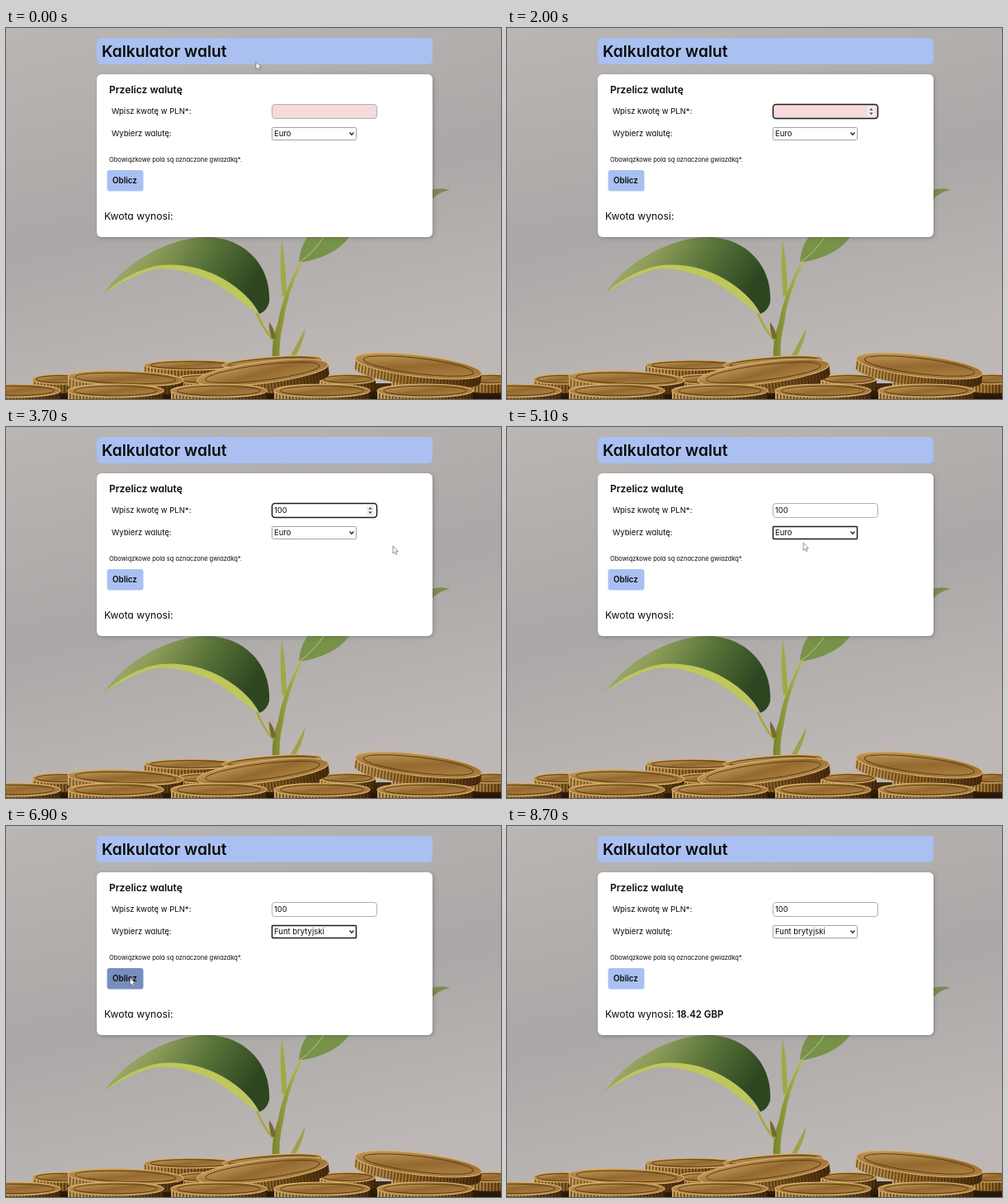
An HTML page that plays this animation: 600 px wide and 449 px high, repeating every 8.8 s.

```html
<!DOCTYPE html>
<html lang="pl">
<head>
<meta charset="utf-8">
<title>Kalkulator walut</title>
<style>
  html, body { margin: 0; width: 100%; height: 100%; overflow: hidden; background: #b3b0af; }
  svg { display: block; width: 100vw; height: 100vh; }
  text { font-family: Inter, "Open Sans", sans-serif; font-feature-settings: "cv11", "calt" 0; fill: #0c0c0c; }
  .bold { font-weight: 600; }
  .label { font-size: 9.5px; }
</style>
</head>
<body>
<svg viewBox="0 0 600 449" preserveAspectRatio="none">
  <defs>
    <linearGradient id="wall" x1="0" y1="0" x2=".3" y2="1">
      <stop offset="0" stop-color="#b9b6b4"/>
      <stop offset=".55" stop-color="#aaa7a6"/>
      <stop offset="1" stop-color="#bdb8b6"/>
    </linearGradient>
    <linearGradient id="leaf" x1="0" x2="1" y2=".3">
      <stop offset="0" stop-color="#b1b986"/>
      <stop offset=".35" stop-color="#8b9b57"/>
      <stop offset=".65" stop-color="#587239"/>
      <stop offset="1" stop-color="#2d4620"/>
    </linearGradient>
    <linearGradient id="stem" x1="0" x2="1">
      <stop offset="0" stop-color="#78832a"/>
      <stop offset="1" stop-color="#b7bb52"/>
    </linearGradient>
    <linearGradient id="face" x1="0" y1="0" x2="1" y2="1">
      <stop offset="0" stop-color="#d3ab69"/>
      <stop offset=".5" stop-color="#94692f"/>
      <stop offset="1" stop-color="#b98e4c"/>
    </linearGradient>
    <linearGradient id="rim" x1="0" x2="1">
      <stop offset="0" stop-color="#cda25c"/>
      <stop offset=".4" stop-color="#a2742f"/>
      <stop offset="1" stop-color="#4a2c0c"/>
    </linearGradient>
    <linearGradient id="floor" x1="0" y1="0" x2="0" y2="1">
      <stop offset="0" stop-color="#5c3c17"/>
      <stop offset="1" stop-color="#241305"/>
    </linearGradient>
    <pattern id="ridges" width="4" height="30" patternUnits="userSpaceOnUse">
      <rect width="1.6" height="30" fill="#2c1804" opacity=".6"/>
    </pattern>
    <filter id="shade" x="-5%" y="-15%" width="110%" height="130%">
      <feDropShadow dx="1.5" dy="1.5" stdDeviation="2" flood-color="#444" flood-opacity=".35"/>
    </filter>
  </defs>

  <rect width="600" height="449" fill="url(#wall)"/>

  <g id="plant">
    <path d="M512 197Q526 192 538 196Q525 198 516 208Z" fill="#7d8a52"/>
    <path d="M355 284Q356 264 368 250H418Q401 277 355 284Z" fill="#78924a"/>
    <path d="M355 284Q374 271 387 250" fill="none" stroke="#bcc77d"/>
    <path d="M119 321C146 281 202 252 246 253C292 255 322 290 319 332Q316 343 307 346C290 310 230 282 185 288Q149 299 119 321Z" fill="url(#leaf)"/>
    <path d="M119 321Q151 293 187 287C237 282 285 308 307 346C288 336 274 319 246 305Q210 289 180 292Q150 300 119 321Z" fill="#bdc75a"/>
    <path d="M323 405Q321 379 330 355Q335 324 357 282L359 284Q341 320 336 357Q330 381 332 405Z" fill="url(#stem)"/>
    <path d="M304 345Q311 363 324 378" fill="none" stroke="#a5a83a" stroke-width="2.6"/>
    <path d="M335 325Q331 288 334 256Q340 291 340 323Z" fill="#a0aa43"/>
    <path d="M322 376Q318 363 319 356Q326 365 327 376Z" fill="#7b6830"/>
    <path d="M340 405Q351 386 363 363Q360 386 345 406Z" fill="#a0a24a"/>
  </g>

  <path d="M0 438L62 430L230 420H390L430 430H600V449H0Z" fill="url(#floor)"/>
  <g id="coins"></g>

  <rect x="110" y="12" width="407" height="32" rx="5" fill="#a9c0f1"/>
  <text class="bold" x="116" y="35" font-size="19.2">Kalkulator walut</text>

  <rect x="110" y="56" width="407" height="197" rx="6" fill="#fff" filter="url(#shade)"/>
  <text class="bold" x="125" y="79" font-size="12.1">Przelicz walutę</text>
  <text class="label" x="128" y="104">Wpisz kwotę w PLN*:</text>
  <text class="label" x="128" y="131">Wybierz walutę:</text>

  <rect id="field" x="322.5" y="92.5" width="127" height="17" rx="3.5"/>
  <text id="amount" class="label" x="325" y="104.3"></text>
  <path id="caret" d="M0 96V107" stroke="#111"/>
  <g id="spinner">
    <rect x="437" y="95" width="9" height="12" fill="#efefef"/>
    <path d="M439.3 99.5L441.5 97L443.7 99.5ZM439.3 102.5L441.5 105L443.7 102.5Z" fill="#444"/>
  </g>

  <rect id="select" x="322.5" y="120.5" width="102" height="15" rx="1" fill="#fff"/>
  <text id="currency" class="label" x="325" y="131.3"></text>
  <path d="M416.5 126.5L419 129.3L421.5 126.5" fill="none" stroke="#222" stroke-width="1.3"/>

  <text x="125" y="161.5" font-size="7.5">Obowiązkowe pola są oznaczone gwiazdką*.</text>
  <rect id="button" x="122.5" y="172" width="44" height="25.5" rx="3"/>
  <text class="bold" x="129" y="188" font-size="9.8">Oblicz</text>
  <text x="119" y="232" font-size="12.2">Kwota wynosi:</text>
  <text id="result" class="bold" x="205.5" y="232" font-size="11.5">18.42 GBP</text>

  <path id="cursor" d="M0 0V9L2 7.2L3.6 10.3L5 9.6L3.6 6.6H6.3Z" fill="#fff" stroke="#666" stroke-width=".7"/>
</svg>
<script>
const LOOP = 8800, STEP = 100, BLINK = 530;
const FOCUS = 1000, TYPE = 2200, KEY_GAP = 250, OPEN = 4500, CHOOSE = 5400, SUBMIT = 7000;
const $ = id => document.getElementById(id);

function coin(cx, cy, rx, ry, tilt = 0) {
  const side = `M${-rx} 0V11A${rx} ${ry} 0 0 0 ${rx} 11V0Z`;
  return `<g transform="translate(${cx} ${cy}) rotate(${tilt})">
    <path d="${side}" fill="url(#rim)"/><path d="${side}" fill="url(#ridges)"/>
    <ellipse rx="${rx}" ry="${ry}" fill="url(#face)" stroke="#d8b272" stroke-width="1.2"/>
    <ellipse rx="${rx * .87}" ry="${ry * .72}" fill="none" stroke="#5f3e14"/>
  </g>`;
}

function row(count, x, gap, y, rx, ry) {
  return Array.from({ length: count }, (_, i) => coin(x + gap * i, y, rx, ry)).join('');
}

$('coins').innerHTML =
  coin(224, 408, 56, 6) + coin(322, 404, 60, 6, -4) +
  row(7, 66, 87, 425, 34, 6) +
  coin(311, 417, 80, 13, -7) + coin(500, 409, 77, 13, 7) + coin(145, 424, 70, 9, 2) +
  row(5, 8, 125, 439, 58, 8);

// time, x, y
const route = [
  [0, 303, 41], [1000, 370, 96], [2700, 474, 149], [3700, 469, 144], [OPEN, 418, 126],
  [6300, 191, 181], [SUBMIT, 148, 184], [7600, 120.5, 183], [8300, -10, 178]
];

function pointAt(t) {
  const i = route.findIndex(p => p[0] > t);
  if (i < 0) return route[route.length - 1].slice(1);
  const [t0, x0, y0] = route[i - 1], [t1, x1, y1] = route[i];
  const k = (t - t0) / (t1 - t0), e = k * k * (3 - 2 * k);
  return [x0 + (x1 - x0) * e, y0 + (y1 - y0) * e];
}

function outline(el, focused, idle) {
  el.setAttribute('stroke', focused ? '#1c1c1c' : idle);
  el.setAttribute('stroke-width', focused ? 1.5 : 1);
}

const show = (el, on) => el.setAttribute('visibility', on ? 'visible' : 'hidden');

function draw(t) {
  const typed = Math.max(0, Math.min(3, Math.floor((t - TYPE) / KEY_GAP) + 1));
  const typing = t >= FOCUS && t < OPEN;
  const lastKey = typed ? TYPE + (typed - 1) * KEY_GAP : FOCUS;

  $('amount').textContent = '100'.slice(0, typed);
  $('field').setAttribute('fill', typed ? '#fff' : '#f7dadb');
  outline($('field'), typing, '#b0b0b0');
  show($('spinner'), typing);

  const end = typed ? $('amount').getComputedTextLength() : 0;
  $('caret').setAttribute('transform', `translate(${Math.round(325 + end) + .5} 0)`);
  show($('caret'), typing && (t - lastKey) % (2 * BLINK) < BLINK);

  $('currency').textContent = t < CHOOSE ? 'Euro' : 'Funt brytyjski';
  outline($('select'), t >= OPEN && t < SUBMIT, '#a3a3a3');

  const [x, y] = pointAt(t);
  $('cursor').setAttribute('transform', `translate(${x} ${y})`);
  show($('cursor'), t < FOCUS || t >= TYPE);

  const hover = x > 118 && x < 166 && y > 172 && y < 198;
  $('button').setAttribute('fill', hover ? '#768fbd' : '#a9c0f1');
  show($('result'), t >= SUBMIT);
}

const start = performance.now();
function tick(now) {
  const t = Math.max(0, now - start) % LOOP;
  draw(Math.floor(t / STEP) * STEP);
  requestAnimationFrame(tick);
}
draw(0);
requestAnimationFrame(tick);
</script>
</body>
</html>
```
